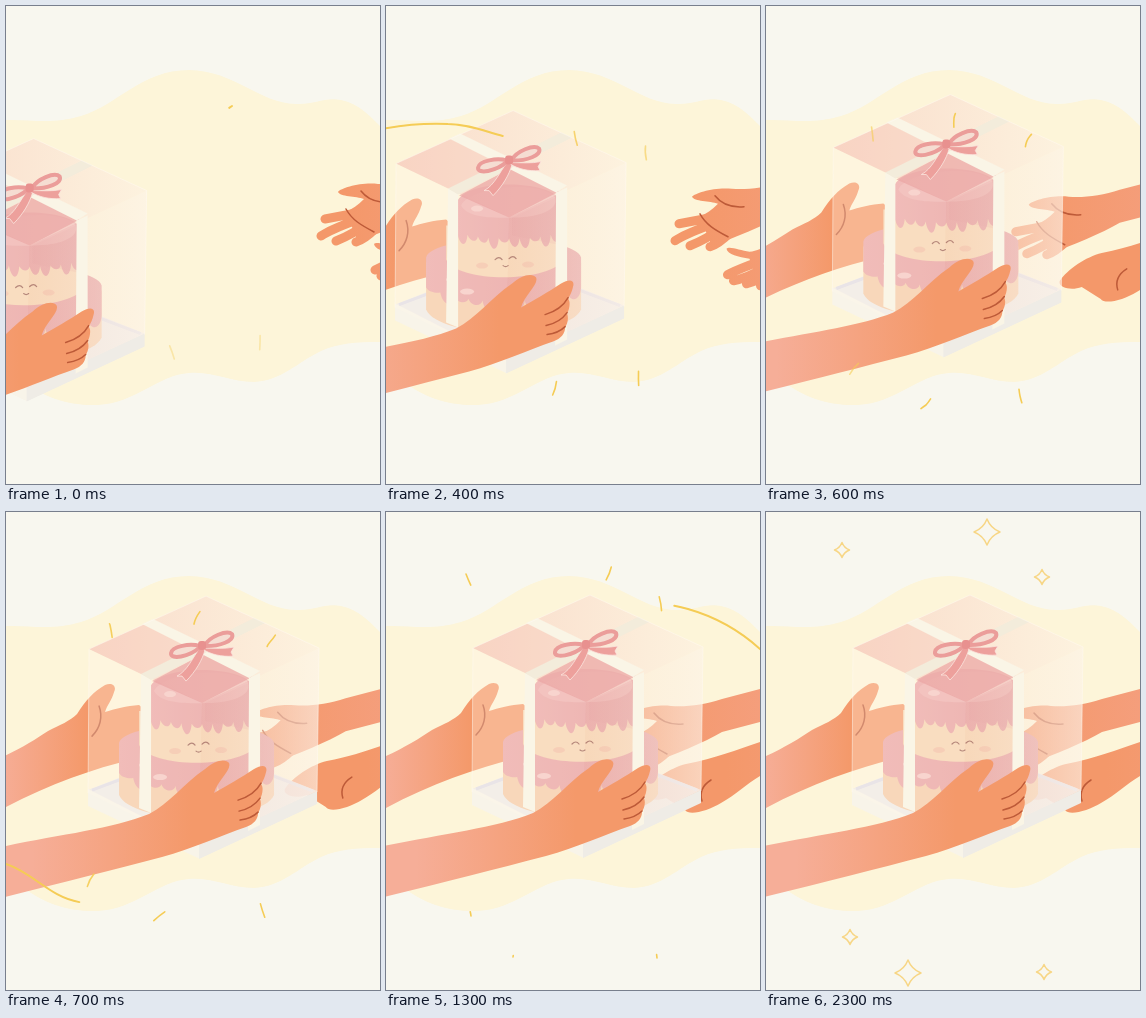
Recreate the animation shown at these times as an HTML page. Size 374 by 478 pixels, loop 2400 ms.

```html
<!DOCTYPE html>
<html lang="en">
<head>
<meta charset="utf-8">
<title>Cake delivery</title>
<style>
html, body { margin: 0; width: 100%; height: 100%; overflow: hidden; background: #f8f7ef; }
svg { display: block; }
.crease { fill: none; stroke: #bd5a38; stroke-width: 1.5; stroke-linecap: round; }
.fingers { fill: none; stroke: url(#hand); stroke-width: 9; stroke-linecap: round; }
.trail, .star { fill: none; stroke: #f5cc55; stroke-linecap: round; stroke-linejoin: round; }
.star { stroke: #f7d685; stroke-width: 1.5; }
</style>
</head>
<body>
<svg width="374" height="478" viewBox="0 0 374 478">
  <defs>
    <linearGradient id="arm" gradientUnits="userSpaceOnUse" x1="30" x2="190">
      <stop stop-color="#f6ae98"/><stop offset="1" stop-color="#f4996a"/>
    </linearGradient>
    <linearGradient id="backArm" gradientUnits="userSpaceOnUse" x1="0" x2="85">
      <stop stop-color="#f6ad96"/><stop offset="1" stop-color="#f4996a"/>
    </linearGradient>
    <linearGradient id="hand" gradientUnits="userSpaceOnUse" x1="340" x2="520">
      <stop stop-color="#f4986a"/><stop offset="1" stop-color="#f5a184"/>
    </linearGradient>
    <linearGradient id="lid" x1="0" x2="1">
      <stop stop-color="#f7cdc2" stop-opacity=".85"/><stop offset="1" stop-color="#fdf1e2" stop-opacity=".9"/>
    </linearGradient>
    <linearGradient id="side" x1="0" x2="1">
      <stop stop-color="#fbe5d5" stop-opacity=".3"/><stop offset="1" stop-color="#fdf3e8" stop-opacity=".65"/>
    </linearGradient>
    <linearGradient id="icing" x1="0" x2="1">
      <stop stop-color="#eaa3a4"/><stop offset="1" stop-color="#e29396"/>
    </linearGradient>
  </defs>

  <path fill="#fdf5d9" d="M0,114C25,113 45,119 75,110C112,99 135,64 183,64C230,65 252,97 290,98C308,99 318,91 335,94C353,98 364,110 374,120V336C350,336 333,337 315,345C292,356 275,375 248,376C223,376 208,365 183,367C152,369 130,397 92,399C60,400 38,390 22,379C14,375 8,373 0,372Z"/>

  <g id="upper">
    <path fill="url(#hand)" d="M480,156L423,171C405,177 388,179 372,178C355,176 335,182 332,186C334,191 350,190 358,193C352,199 346,203 340,206L352,236C375,226 405,215 423,204L480,189Z"/>
    <path class="fingers" d="M356,206L319,213M356,212C340,218 325,223 315,230M360,218C350,226 340,231 330,235M370,222C362,230 356,234 350,236"/>
    <path class="crease" d="M340,203C346,214 355,219 368,226M355,185C362,194 372,197 384,196"/>
  </g>
  <g id="open">
    <path fill="url(#hand)" d="M490,200L425,228C412,232 402,240 391,241C382,240 371,235 368,238C369,244 380,246 391,248L398,268C404,276 414,270 425,262L490,238Z"/>
    <path class="fingers" d="M402,250C390,255 378,259 369,264M404,258C394,264 384,268 375,270M410,262C402,268 394,272 388,273M416,262C412,270 406,275 402,275"/>
    <path class="crease" d="M403,241C403,252 406,262 412,268"/>
  </g>
  <g id="grip">
    <path fill="url(#hand)" d="M460,198L374,230C350,238 330,246 300,252C284,256 266,268 258,280C256,287 270,290 280,286L299,298C303,304 322,299 335,291C350,283 360,272 374,264L460,230Z"/>
    <path class="crease" d="M325,268C317,273 313,279 316,289"/>
  </g>

  <g id="gift">
    <path fill="url(#backArm)" d="M0,244C18,236 34,226 46,218C58,212 68,208 75,201C84,187 91,179 103,172C110,169 115,173 112,179C110,187 105,192 103,199C112,196 125,193 137,192C150,200 150,240 132,246C90,256 45,272 0,296Z"/>
    <path class="crease" d="M97,193C101,204 98,215 90,223"/>

    <path fill="#ece8ec" opacity=".8" d="M86,277L200,232L315,278L198,334Z"/>
    <path fill="#f8f4e9" d="M86,276L198,333V346L86,293Z"/>
    <path fill="none" stroke="#dfdce6" stroke-width="3" d="M90,277L200,236L311,278"/>

    <g id="cake">
      <path fill="#f4caa6" d="M117,235V282C130,312 258,312 272,282V235Z"/>
      <path id="lowIcing" fill="url(#icing)"/>
      <path fill="#f6d2ae" d="M137,198V232C148,256 244,256 256,230V198Z"/>
      <path id="topIcing" fill="url(#icing)"/>
      <path fill="#f0b3b2" d="M152,178C160,160 225,152 245,168C252,180 234,190 204,190C178,191 158,189 152,178Z" opacity=".7"/>
      <path fill="#d8838c" opacity=".18" d="M203,190L253,167V218L203,208Z"/>
      <g fill="#f4c6c2"><ellipse cx="168" cy="181" rx="6" ry="3"/><ellipse cx="142" cy="252" rx="5" ry="3"/><ellipse cx="158" cy="264" rx="7" ry="3"/></g>
      <g fill="#f0ad98" opacity=".55"><ellipse cx="173" cy="238" rx="6" ry="3"/><ellipse cx="219" cy="237" rx="6" ry="3"/></g>
      <path fill="none" stroke="#95584c" stroke-width="1.2" stroke-linecap="round" d="M186,232q4,-4 7,0M200,231q4,-4 7,0M194,238q2.500,2 5,0"/>
    </g>

    <path fill="#fdf3e6" opacity=".3" d="M87,136L200,190L197,334L86,280Z"/>
    <path fill="url(#side)" d="M200,190L317,135L315,279L197,334Z"/>
    <path fill="url(#lid)" opacity=".72" d="M87,136L204,83L317,135L200,190Z"/>
    <path fill="#eba5a4" opacity=".7" d="M150,168L201,141L250,164L200,190Z"/>
    <path fill="#f3b8ad" opacity=".25" d="M87,136L145,110L201,136L143,163Z"/>
    <path fill="#efece6" d="M197,333L315,278V291L197,346Z"/>

    <path fill="#faf5e6" d="M139,161L149,166V300L137,295ZM247,165L258,160V312L246,318ZM140,111L151,106L258,158L247,165Z"/>
    <path fill="#f3ecdb" d="M139,161L252,105L263,110L149,167Z"/>
    <path fill="none" stroke="#fffaf2" opacity=".5" d="M87,136L204,83L317,135L315,279M87,136L86,280"/>

    <g fill="#eda09c" stroke="#fbe6df" stroke-width=".8">
      <path d="M198,135C190,145 186,157 175,163L180,163L184,168C194,158 200,147 203,137Z"/>
      <path d="M203,135C212,135 222,136 232,134L229,139L231,143C219,144 209,141 202,137Z"/>
    </g>
    <g fill="#f5ddd2" stroke="#eb9d9a" stroke-width="4" stroke-linejoin="round">
      <path d="M198,133C188,130 170,133 169,140C168,147 187,144 198,134Z"/>
      <path d="M203,132C207,124 225,116 230,121C233,128 217,133 204,133Z"/>
    </g>
    <rect x="196" y="128" width="8" height="9" rx="3" fill="#e8918f"/>

    <path fill="url(#arm)" d="M-2,334C55,322 110,316 147,301C167,291 181,271 203,256C212,247 224,245 227,250C230,257 215,268 212,280C224,273 240,264 252,256C260,251 266,252 264,259C263,264 261,268 259,271C262,275 260,282 258,286C260,291 258,297 256,300C256,306 252,311 244,314C220,322 190,336 160,344C110,357 60,370 -2,385Z"/>
    <path class="crease" d="M259,270C254,279 246,284 236,287M258,285C253,292 246,296 237,298M256,299C251,304 245,306 238,307"/>
  </g>

  <path id="swoosh" class="trail" stroke-width="2" d="M226,100C205,114 180,126 158,133C125,140 95,118 62,118C40,117 20,118 -10,124C-80,150 -60,330 0,352C30,362 45,388 80,391C130,395 180,420 240,415C310,410 350,380 390,350C440,300 430,170 374,137C353,118 330,105 302,97C280,91 260,90 240,92"/>
  <g id="sparks"></g>
  <g id="stars"></g>
</svg>
<script>
const LOOP = 2400;
const $ = id => document.getElementById(id);
const clamp = v => Math.max(0, Math.min(1, v));
const ease = (t, start, length) => (1 - Math.cos(Math.PI * clamp((t - start) / length))) / 2;
const move = (id, x, y) => $(id).setAttribute('transform', `translate(${x} ${y})`);

function add(parent, cls, d) {
  const path = document.createElementNS('http://www.w3.org/2000/svg', 'path');
  path.setAttribute('class', cls);
  path.setAttribute('d', d);
  return $(parent).appendChild(path);
}

// Linear interpolation through [time, value] pairs
function along(t, keys) {
  let i = 1;
  while (i < keys.length - 1 && t > keys[i][0]) i++;
  const [t0, a] = keys[i - 1], [t1, b] = keys[i];
  return a + (b - a) * clamp((t - t0) / (t1 - t0));
}

// Domed icing with uneven drips along its lower edge
function icing(id, left, right, top, edge, sag, count) {
  const step = (right - left) / count, mid = (left + right) / 2;
  let d = `M${left},${edge}V${top + 18}C${left + 6},${top - 6} ${right - 6},${top - 6} ${right},${top + 18}V${edge}`;
  for (let i = 0; i < count; i++) {
    const x = right - i * step, u = (x - step - mid) / (mid - left);
    const y = edge + sag * (1 - u * u), drop = 10 + 5 * Math.sin(i * 2.3);
    d += `C${x - 1},${y + drop} ${x - step + 3},${y + drop} ${x - step},${y}`;
  }
  $(id).setAttribute('d', d + 'Z');
}
icing('topIcing', 148, 252, 157, 205, 6, 10);
icing('lowIcing', 117, 272, 212, 260, 14, 11);

// Start time, speed in px/ms, course
const sparks = [
  [400, .095, 'M108,147C107,130 106,122 104,113C97,95 86,78 80,62'],
  [140, .092, 'M198,155C189,138 187,124 188,112C192,92 222,80 226,51'],
  [200, .066, 'M262,160C258,147 258,137 264,130C274,119 279,105 273,84'],
  [410, .066, 'M97,354C89,359 83,367 81,376C80,388 84,396 85,404'],
  [-120, .092, 'M162,336C173,360 175,382 160,399C146,408 130,425 127,445'],
  [-120, .089, 'M254,326C255,345 250,370 254,390C258,408 269,425 271,446']
].map(([start, speed, d]) => ({ start, speed, path: add('sparks', 'trail', d) }));

// Centre, radius, tilt when it appears
const stars = [
  [76, 38, 7.5, 18], [221, 20, 13, 38], [276, 65, 7.5, 20],
  [84, 425, 7.5, 18], [142, 461, 13, 34], [278, 460, 7.5, 20]
].map(([x, y, r, tilt]) => {
  const k = r * .28;
  const d = `M0,${-r}Q${k},${-k} ${r},0Q${k},${k} 0,${r}Q${-k},${k} ${-r},0Q${-k},${-k} 0,${-r}Z`;
  return { x, y, tilt, path: add('stars', 'star', d) };
});

function dash(path, tail, head) {
  const from = Math.max(0, tail), to = Math.min(path.getTotalLength(), head);
  path.style.visibility = to > from ? 'visible' : 'hidden';
  path.style.strokeDasharray = `${Math.max(0, to - from)} 9999`;
  path.style.strokeDashoffset = -from;
}

const headKeys = [[0, 3], [200, 75], [500, 340], [700, 590], [1300, 1258], [1400, 1340]];
const tailKeys = [[190, 0], [200, 5], [500, 173], [700, 480], [1300, 1140], [1480, 1400]];

function draw(t) {
  const far = 1 - ease(t, -50, 830);
  move('gift', -178 * far, 50 * far);

  const reach = ease(t, 180, 600), hold = 1 - ease(t, 500, 400);
  move('upper', -87 * reach, 16 * reach);
  move('open', -92 * reach, 16 * reach);
  move('grip', 42 * hold, -6 * hold);
  $('open').style.display = t < 600 ? '' : 'none';
  $('grip').style.display = t < 600 ? 'none' : '';

  dash($('swoosh'), along(t, tailKeys), along(t, headKeys));
  for (const { start, speed, path } of sparks) {
    const head = speed * (t - start) + 7;
    dash(path, head - 14, head);
    path.style.strokeWidth = 1.6;
    path.style.opacity = clamp((t - start) / 320);
  }
  for (const { x, y, tilt, path } of stars) {
    const size = ease(t, 1320, 430), turn = 1 - ease(t, 1750, 550);
    path.setAttribute('transform', `translate(${x} ${y}) rotate(${tilt * turn - 90 * (1 - size)}) scale(${size})`);
    path.style.visibility = size > 0 ? 'visible' : 'hidden';
  }
}

const begin = performance.now();
function tick() {
  draw((performance.now() - begin) % LOOP);
  requestAnimationFrame(tick);
}
tick();
</script>
</body>
</html>
```
